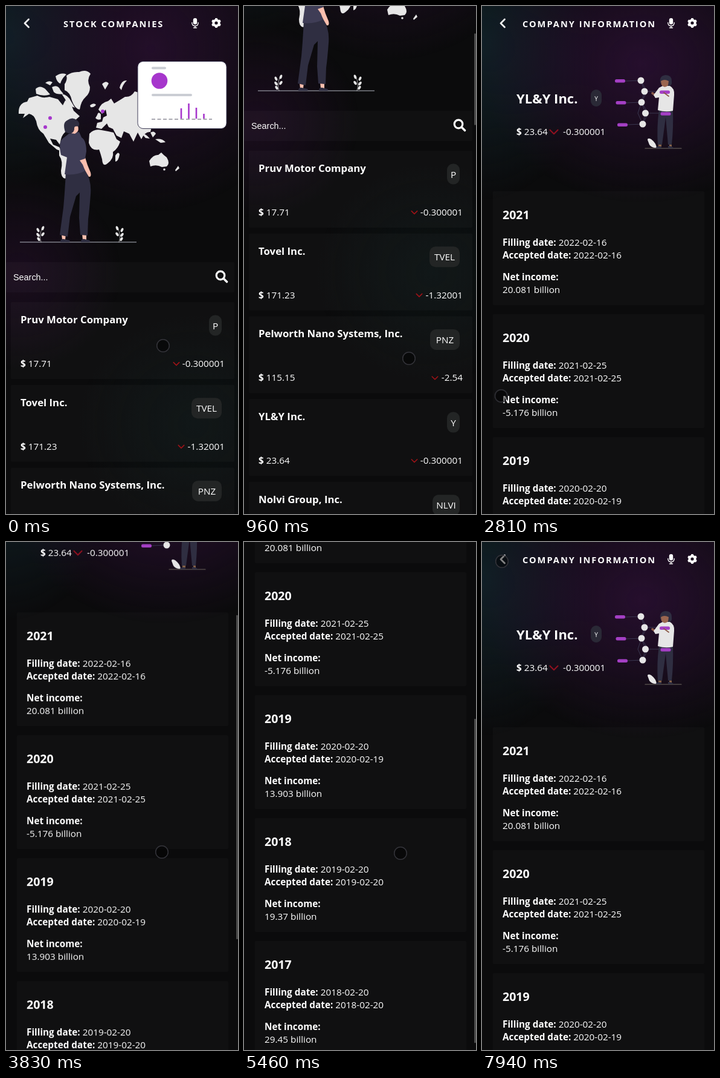
These frames come from a looping animation (384 by 839 pixels, 8 s). An HTML page:

```html
<!DOCTYPE html>
<html lang="en">
<head>
<meta charset="utf-8">
<title>Stock companies</title>
<style>
html, body { margin: 0; width: 100%; height: 100%; overflow: hidden; background: #0b0b0c; }
svg { display: block; width: 384px; height: 839px; }
text { font: 15.3px "Open Sans", "Noto Sans", sans-serif; fill: #fff; }
.b { font-weight: 700; }
.head { font-size: 14.6px; font-weight: 700; letter-spacing: 2px; }
.name { font-size: 16.8px; font-weight: 700; }
.big { font-size: 22px; font-weight: 700; }
.year { font-size: 19.6px; font-weight: 700; }
.tiny { font-size: 10px; }
.input { font: 14.4px "Liberation Sans", Arial, sans-serif; }
.mid { text-anchor: middle; }
.end { text-anchor: end; }
.card { fill: #fff; fill-opacity: .022; }
.line { fill: none; stroke-linecap: round; stroke-linejoin: round; }
.land { fill: #e6e6e6; }
.accent { fill: #a636cc; }
.dark { fill: #2f2e41; }
.cloth { fill: #3f3d56; }
.skin { fill: #fbbfae; }
.tan { fill: #8a6548; }
.brown { fill: #9a6650; }
.thumb { fill: #4b4b4b; }
</style>
</head>
<body>
<svg id="stage" viewBox="0 0 384 839" xmlns="http://www.w3.org/2000/svg"></svg>
<script>
const LOOP = 8000;

const text = (x, y, s, cls = '') =>
  `<text x="${x}" y="${y}" class="${cls}">${s.replace(/&/g, '&amp;')}</text>`;
const box = (x, y, w, h, r, attrs) =>
  `<rect x="${x}" y="${y}" width="${w}" height="${h}" rx="${r}" ${attrs}/>`;
const dot = (x, y, r, attrs) => `<circle cx="${x}" cy="${y}" r="${r}" ${attrs}/>`;
const shape = (d, cls) => `<path d="${d}" class="${cls}"/>`;
const line = (d, color, w) => `<path d="${d}" class="line" stroke="${color}" stroke-width="${w}"/>`;
const price = (x, y, v) => `<text x="${x}" y="${y}"><tspan class="b">$</tspan> ${v}</text>`;
const field = (x, y, label, v) =>
  `<text x="${x}" y="${y}"><tspan class="b">${label}:</tspan> ${v}</text>`;
const arrow = (x, y, w, color, up) => {
  const h = up ? -w / 4 : w / 4;
  return line(`M${x - w / 2} ${y - h}L${x} ${y + h}L${x + w / 2} ${y - h}`, color, w / 6);
};

const glows = [];
const glow = (x, y, rx, ry, color, alpha) => {
  const id = 'glow' + glows.length;
  glows.push(`<radialGradient id="${id}"><stop stop-color="${color}" stop-opacity="${alpha}"/>
    <stop offset=".5" stop-color="${color}" stop-opacity="${alpha * .55}"/>
    <stop offset="1" stop-color="${color}" stop-opacity="0"/></radialGradient>`);
  return `<ellipse cx="${x}" cy="${y}" rx="${rx}" ry="${ry}" fill="url(#${id})"/>`;
};

function header(title, x) {
  let gear = dot(348, 28, 4.6, 'fill="none" stroke="#fff" stroke-width="4"');
  for (let i = 0; i < 6; i++)
    gear += `<rect x="346" y="20" width="4" height="4" rx="1" fill="#fff" transform="rotate(${i * 60} 348 28)"/>`;
  return line('M37.5 22L31 28.5L37.5 35', '#eee', 2.8) + text(x, 34.5, title, 'head') +
    box(309.8, 20, 6.4, 10.5, 3.2, 'fill="#fff"') +
    line('M307.8 27.5Q308 33 313 33Q318 33 318.2 27.5M313 33V36M310.5 36H315.5', '#fff', 1.4) + gear;
}

function worldMap() {
  const land = [
    'M21 178Q20 160 35 158L38 152L52 148Q60 153 72 150L86 154L94 164L98 156L108 163L112 173L122 182L113 190L104 195L101 206Q93 211 91 220L89 229L83 221L73 219L78 229L88 233L92 240L84 237L71 226L62 211Q52 205 50 190Q46 179 38 178L28 185L31 178Z',
    'M88 236Q104 230 118 242Q133 246 130 257Q116 270 98 285Q91 284 91 272Q95 256 88 247Z',
    'M97 129Q102 122 100 115Q109 108 121 109Q133 104 140 112Q133 122 139 134Q139 144 132 150Q124 157 122 171Q114 170 109 156Q106 142 97 139Z',
    'M82 116Q92 109 100 113Q92 120 90 128Q84 126 82 116Z',
    'M49 137Q56 130 65 137L73 146Q62 150 50 145Z',
    'M76 134Q86 129 90 139L95 145Q84 147 79 142Z',
    'M92 145Q103 147 108 158L114 168Q101 165 98 154Z',
    'M65 127Q71 122 77 126L73 131Z',
    'M139 164Q145 159 149 163Q146 168 140 167Z',
    'M151 180Q153 173 157 179L157 187Q151 189 148 185Z',
    'M153 171Q158 159 169 157L174 153L179 161L189 155L197 150Q207 151 213 141Q224 145 235 146L242 196L239 208Q230 207 224 220L218 209L211 224L204 211L195 207L191 218L183 214L177 203L170 200L167 194L158 203L149 201L151 193L159 191L161 184L167 181L165 171L159 178Z',
    'M138 211Q146 202 158 205L169 207L178 209L183 220L189 224Q185 236 177 241Q179 252 168 260Q160 267 159 253Q156 242 154 237Q141 240 137 226Z',
    'M181 247Q186 239 188 245Q186 257 181 257Z',
    'M237 256Q244 245 252 246L257 242L261 246L266 250Q272 260 266 265L258 266Q249 261 239 265Z',
    'M280 271L285 264L287 268L281 273Z',
    'M224 210Q232 211 238 219L231 218Z', 'M239 209Q245 205 248 211L243 217Z',
    'M247 220Q258 218 264 225L256 226Z',
    'M159 129Q166 122 170 128L164 138Z', 'M188 135Q191 122 200 123Q193 130 191 139Z'
  ];
  return land.map(d => shape(d, 'land')).join('') + dot(262, 270, 1.8, 'class="land"') +
    [[73, 185], [65, 200], [160, 174]].map(p => dot(...p, 3, 'class="accent"')).join('');
}

function chartCard() {
  const bars = [[290, 17], [302.5, 25], [315, 18], [327.5, 8]];
  return box(218, 91.5, 147, 111, 9, 'fill="#fff" stroke="#3f3d56"') +
    box(241, 100.5, 24, 4, 2, 'fill="#cacdd4"') + box(241, 145, 67, 4, 2, 'fill="#cacdd4"') +
    dot(254, 123.5, 13.3, 'class="accent"') +
    bars.map(([x, h]) => box(x - 1.3, 186 - h, 2.6, h, 0, 'class="accent"')).join('') +
    '<path d="M241 187H341" stroke="#8d8c98" stroke-width="1.5" stroke-dasharray="6 3.5"/>';
}

function viewer() {
  return shape('M92 377H99L98 386H93ZM126 376H133L133 386H127Z', 'skin') +
    shape('M90 390Q90 384 96 385L105 387Q107 390 104 390ZM124 390Q124 384 130 385L138 387Q141 390 137 390Z', 'dark') +
    shape('M99 272L131 271Q142 288 140 311Q138 338 136 352L135 379L123 378L121 350L122 308L116 314L106 348L102 381L89 378L95 333Q98 300 99 272Z', 'dark') +
    shape('M122 253L131 250Q134 262 140 275Q142 283 137 282Q131 270 122 259Z', 'skin') +
    shape('M104 211L121 208L125 217Q133 222 133 240L131 252L122 255L127 262L131 272Q118 280 97 278L101 250L91 246Q86 224 95 218Z', 'cloth') +
    shape('M111 199L119 198Q121 205 118 208L114 211L107 210Z', 'skin') +
    shape('M98 208Q93 193 101 189Q110 182 118 189Q123 193 120 199Q112 197 113 204Q111 212 103 210Z', 'dark');
}

function plant(x, flip) {
  const leaves = [[-4, 370, 25], [4, 367, -20], [-4, 378, 35], [4, 377, -35], [-3, 385, 30]];
  return `<g transform="translate(${x} 0) scale(${flip} 1)">` +
    line('M1 390Q-3 380 3 366', '#bbb', .8) +
    leaves.map(([dx, y, a]) =>
      `<ellipse cx="${dx}" cy="${y}" rx="2" ry="3.6" class="land" transform="rotate(${-a} ${dx} ${y})"/>`).join('') + '</g>';
}

const stocks = [
  ['Pruv Motor Company', 'P', 21, '17.71', '-0.300001', 282],
  ['Tovel Inc.', 'TVEL', 50, '171.23', '-1.32001', 290],
  ['Pelworth Nano Systems, Inc.', 'PNZ', 49, '115.15', '-2.54', 316],
  ['YL&Y Inc.', 'Y', 21, '23.64', '-0.300001', 282],
  ['Nolvi Group, Inc.', 'NLVI', 45, '29.5932', '0.593201', 288],
  ['UZO Inc.', 'UZO', 41, '25.91', '0.299999', 288],
  ['Bank of Tarvena Corporation', 'BTV', 42, '44.18', '0.210001', 288]
];

const stockCard = ([name, code, w, value, change, ax], i) => {
  const y = 489 + i * 136.7, up = change[0] !== '-';
  return box(8, y, 370, 127, 2, 'class="card"') + text(24, y + 35, name, 'name') +
    box(357 - w, y + 21.5, w, 34, 10, 'fill="#232525"') + text(357 - w / 2, y + 44.5, code, 'mid') +
    price(24, y + 107, value) + text(362, y + 107, change, 'end') +
    arrow(ax, y + 102, 9.5, up ? '#0c4310' : '#a01318', up);
};

const listPage = () =>
  glow(0, 50, 190, 250, '#12262e', .75) + glow(240, 70, 260, 270, '#2b1033', .75) +
  glow(20, 440, 170, 160, '#2d0f34', .45) + glow(310, 690, 190, 180, '#0c1c1c', .4) +
  header('STOCK COMPANIES', 95) + worldMap() + chartCard() +
  '<path d="M23 390H216" stroke="#b3b7c2" stroke-width="1.2"/>' +
  plant(57, 1) + plant(188, -1) + viewer() +
  box(0, 423, 378, 50, 2, 'class="card"') + text(12, 453, 'Search...', 'input') +
  dot(355, 445, 6.8, 'fill="none" stroke="#fff" stroke-width="3.2"') + line('M360.5 450.5L365.5 455.5', '#fff', 3.6) +
  stocks.map(stockCard).join('');

function diagram() {
  const nodes = [[263, 123], [269, 141], [264, 159], [270.5, 177], [266, 195]];
  const pills = [[220, 121], [221.5, 157], [224, 193.5]];
  const pill = ([x, y]) => box(x, y, 17, 5.4, 2.5, 'fill="#a43fc4"');
  return line('M' + nodes.map(n => n.join(' ')).join('L') +
      'M237 124L263 123L273 141L264 159L275 177L266 195L241 196M238 160L264 159L258 177L266 195M269 141H294M270 177H296', '#3f3d56', .9) +
    nodes.map(n => dot(...n, 5.5, 'class="land"')).join('') + pills.map(pill).join('') +
    line('M270 235.2H330', '#5d5752', 1.2) +
    shape('M274 221Q274 217 280 220Q288 226 289 234Q281 235 277 229Z', 'land') +
    shape('M292 227H297V233H292ZM310 227H314V233H310Z', 'tan') +
    shape('M293 171H316Q317 202 314 229H308L304 184L298 229H291Q289 200 293 171Z', 'dark') +
    shape('M287 235Q290 230 297 232V235ZM308 235V231Q314 231 318 235Z', 'dark') +
    line('M296 141L289 149L282 144', '#8b5b4a', 3.6) +
    shape('M299 132H311Q319 136 318 147L316 173Q304 176 291 172L293 151L287 152L284 147L293 135Z', 'land') +
    shape('M295 127Q293 115 304 114Q314 114 314 124Q315 132 309 132L298 130Z', 'dark') +
    shape('M296 124Q302 120 309 124L308 131Q302 137 297 130Z', 'brown') +
    pill([294, 139.5]) + pill([295.5, 175.3]) + line('M301 143L309 149', '#8b5b4a', 1.8);
}

const reports = [
  [2021, '2022-02-16', '2022-02-16', '20.081'],
  [2020, '2021-02-25', '2021-02-25', '-5.176'],
  [2019, '2020-02-20', '2020-02-19', '13.903'],
  [2018, '2019-02-20', '2019-02-20', '19.37'],
  [2017, '2018-02-20', '2018-02-20', '29.45']
];

const reportCard = ([year, filed, accepted, income], i) => {
  const y = 306 + i * 203;
  return box(18, y, 350, 188, 2, 'class="card"') + text(34, y + 46, '' + year, 'year') +
    field(34, y + 90, 'Filling date', filed) + field(34, y + 111, 'Accepted date', accepted) +
    text(34, y + 147, 'Net income:', 'b') + text(34, y + 168, income + ' billion');
};

const infoPage = () =>
  glow(0, 60, 190, 260, '#12262e', .75) + glow(265, 95, 270, 230, '#2d1036', .8) +
  header('COMPANY INFORMATION', 67) + text(57, 161, stocks[3][0], 'big') +
  box(180, 138, 18, 28, 9, 'fill="#2a2936"') + text(189, 156.5, stocks[3][1], 'tiny mid') +
  price(57, 213, stocks[3][3]) + arrow(119, 208, 13, '#8e1120') + text(134, 213, stocks[3][4]) +
  diagram() + reports.map(reportCard).join('');

const page = (id, content, thumb) =>
  `<g id="${id}"><rect width="384" height="839" fill="#0b0b0c"/><g id="${id}Body">${content}</g>` +
  box(381, 0, 3, thumb, 0, `id="${id}Thumb" class="thumb"`) + '</g>';

const pages = page('list', listPage(), 151) + page('info', infoPage(), 535);
document.getElementById('stage').innerHTML = `<defs>${glows.join('')}</defs>${pages}` +
  dot(0, 0, 10.3, 'id="cursor" fill="#000" fill-opacity=".45" stroke="#34343a" stroke-width="1.5"');

// Each step is [time, value, easing towards the next step].
const play = (id, steps, frame) => document.getElementById(id).animate(
  steps.map(([t, v, easing = 'linear']) => ({ offset: t / LOOP, easing, ...frame(v) })),
  { duration: LOOP, iterations: Infinity });
const fade = v => ({ opacity: v });
const hold = 'step-end', ease = 'ease-in-out';

function scroll(id, ratio, steps) {
  play(id + 'Body', steps, y => ({ transform: `translate(0px, ${-y}px)` }));
  play(id + 'Thumb', steps, y => ({ transform: `translate(0px, ${y * ratio}px)` }));
}

scroll('list', .182, [[0, 0], [20, 0, ease], [410, 250], [1080, 250, ease], [1450, 500], [LOOP, 500]]);
scroll('info', .6366, [
  [0, 0], [3580, 0, ease], [3960, 250], [4120, 250, ease], [4390, 465],
  [5390, 465], [5460, 459, ease], [6020, 0], [LOOP, 0]
]);

play('info', [[0, 0, hold], [2140, 1, hold], [LOOP, 1]], fade);
play('listThumb', [[0, 0, hold], [60, 1, hold], [LOOP, 1]], fade);
play('infoThumb', [
  [0, 0, hold], [3580, 1], [4690, 1], [4930, 0, hold], [5430, 1], [6350, 1], [6650, 0], [LOOP, 0]
], fade);

play('cursor', [
  [0, [260, 561]], [680, [260, 561], ease], [960, [273, 582]], [1080, [273, 582], ease],
  [1650, [227, 493]], [2500, [227, 493]],
  [2640, [140, 349]], [2770, [14, 560]], [2900, [70, 826]], [3030, [200, 700]], [3150, [258, 512]],
  [4680, [258, 512]], [4790, [259, 514]], [6300, [259, 514]], [6350, [265, 502], ease],
  [7120, [11, 85]], [7330, [25, 88]], [7560, [25, 88], ease], [7930, [33, 32]], [LOOP, [33, 32]]
], ([x, y]) => ({ transform: `translate(${x}px, ${y}px)` }));
</script>
</body>
</html>
```
